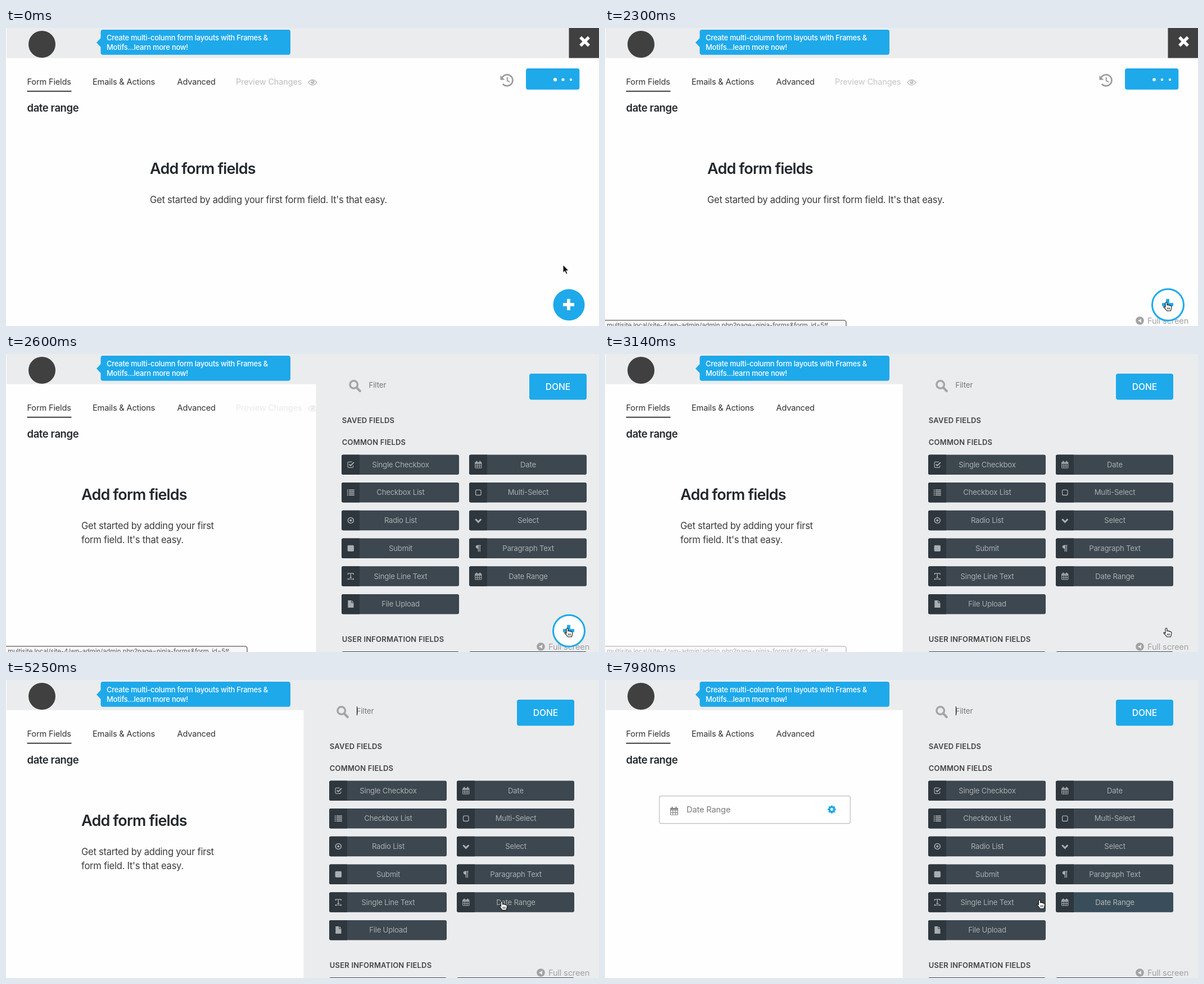
Animation of 1055x531 px, one loop 8000 ms. Source, as an HTML page:

```html
<!DOCTYPE html>
<html lang="en">
<head>
<meta charset="utf-8">
<title>Form builder</title>
<style>
  html, body { margin: 0; width: 100%; height: 100%; overflow: hidden; background: #fefefe; }
  svg { display: block; width: 100vw; height: 100vh; cursor: default; }
  text {
    font-family: Inter, Roboto, "Liberation Sans", sans-serif;
    font-optical-sizing: none;
    white-space: pre;
  }
</style>
</head>
<body>
<svg id="stage" viewBox="0 0 1055 531"></svg>
<script>
const LOOP = 8000;
const BLUE = '#1ea9ea', PANEL = '#ebecee', DARK = '#404040';
const DRAWER_X = 529.5;

// ---- markup helpers ----
const text = (x, y, str, size, fill, { ls = 0, w = 400, mid = false, id = '' } = {}) =>
  `<text ${id && `id="${id}"`} x="${x}" y="${y}" font-size="${size}" font-weight="${w}" fill="${fill}"
    text-anchor="${mid ? 'middle' : 'start'}" style="letter-spacing:${ls}px">${str.replace(/&/g, '&amp;')}</text>`;
const rect = (x, y, w, h, fill, r = 0, extra = '') =>
  `<rect x="${x}" y="${y}" width="${w}" height="${h}" rx="${r}" fill="${fill}" ${extra}/>`;
const path = (d, fill = 'none', stroke = 'none', w = 1, extra = '') =>
  `<path d="${d}" fill="${fill}" stroke="${stroke}" stroke-width="${w}" ${extra}/>`;
const circle = (x, y, r, fill, extra = '') =>
  `<circle cx="${x}" cy="${y}" r="${r}" fill="${fill}" ${extra}/>`;
const group = (id, body, extra = '') => `<g ${id && `id="${id}"`} ${extra}>${body}</g>`;
const at = (x, y, body, color = '#000') => group('', body, `transform="translate(${x} ${y})" color="${color}"`);
const line = (d, w = 1) => path(d, 'none', 'currentColor', w);
const solid = d => path(d, 'currentColor');

// ---- icons, centred on 0,0 ----
const icons = {
  check: line('M4.5 1.5V3.5Q4.5 5.2 2.8 5.2H-3.5Q-5.2 5.2-5.2 3.5V-3Q-5.2-4.7-3.5-4.7H2.5', 1.2) +
         line('M-2.6-.6L-.2 1.8L5.6-4', 2),
  list: line('M-6.5-4.5h2M-6.5-1.5h2M-6.5 1.5h2M-6.5 4.5h2M-3.3-4.5h9.8M-3.3-1.5h9.8M-3.3 1.5h9.8M-3.3 4.5h9.8', 1.7),
  radio: circle(0, 0, 5, 'none', 'stroke="currentColor" stroke-width="1.6"') + circle(0, 0, 2, 'currentColor'),
  stop: rect(-5.7, -5.5, 11.4, 11, 'currentColor', 1.8),
  type: line('M-4.8-2.6V-5H4.8V-2.6M0-5V2.6M-2 2.6H2', 1.4) + line('M-5 5.2H5', 1.1) +
        solid('M-6.3 5.2l2.4-1.9v3.8zM6.3 5.2l-2.4-1.9v3.8z'),
  file: solid('M-5-6.5H1V-2H5.2V6.5H-5zM2-6.5L5.2-3H2z'),
  calendar: line('M-5.6-4.2H5.6V6H-5.6zM-5.6-1.2H5.6M-5.6 2.4H5.6M-2-1.2V6M1.9-1.2V6', 1) +
            line('M-5.6-3H5.6', 1.6) + line('M-3-6.5V-2.6M3-6.5V-2.6', 1.9),
  square: rect(-4.7, -4.7, 9.4, 9.4, 'none', 2, 'stroke="currentColor" stroke-width="1.3"'),
  chevron: line('M-5-2.2L0 2.8L5-2.2', 3),
  para: solid('M4.5-5.8V-4.6H3.6V6H2.2V-4.6H.8V6H-.6V.6Q-4.6.4-4.6-2.6Q-4.6-5.8-.8-5.8z'),
};

const FIELD_W = 209, FIELD_H = 35.5, ROW = 49.7, COLS = [575, 802];
const fields = [
  ['check', 'Single Checkbox', 'calendar', 'Date'],
  ['list', 'Checkbox List', 'square', 'Multi-Select'],
  ['radio', 'Radio List', 'chevron', 'Select'],
  ['stop', 'Submit', 'para', 'Paragraph Text'],
  ['type', 'Single Line Text', 'calendar', 'Date Range'],
  ['file', 'File Upload'],
];

function field(x, y, icon, label, hover = false) {
  const ink = hover ? '#fff' : '#a9aeb1';
  return rect(x, y, FIELD_W, FIELD_H, hover ? BLUE : '#3c474f', 3) +
    path(`M${x + 32} ${y}h-29q-3 0-3 3v${FIELD_H - 6}q0 3 3 3h29z`, '#2f373e') +
    at(x + 16.3, y + 17.7, icons[icon], ink) +
    text(x + 105, y + 22.3, label, 13.2, ink, { ls: -.24, mid: true, w: hover ? 500 : 400 });
}

function fieldGrid() {
  let out = '';
  fields.forEach((row, r) => {
    for (let c = 0; c < row.length / 2; c++)
      out += field(COLS[c], 179.4 + r * ROW, row[c * 2], row[c * 2 + 1]);
  });
  return out + COLS.map(x => rect(x, 530, FIELD_W, 20, '#3c474f', 3)).join('');
}

function gear(x, y) {
  let teeth = '';
  for (let i = 0; i < 8; i++)
    teeth += rect(-1.6, -7.2, 3.2, 4, BLUE, .6, `transform="rotate(${i * 45})"`);
  return at(x, y, teeth + circle(0, 0, 4.1, 'none', `stroke="${BLUE}" stroke-width="3.2"`));
}

// ---- scene ----
const TAB = { ls: -.18 };
const SECTION = { w: 600, ls: .19 };
const header =
  rect(1, 0, 1054, 53.5, PANEL) +
  circle(64, 29, 24, DARK) +
  rect(168.5, 3, 337.5, 44.7, BLUE, 4) + path('M161 26L169 17.5V34.5z', BLUE) +
  text(179, 21.5, 'Create multi-column form layouts with Frames &', 13, '#fff', { w: 500, ls: -.26 }) +
  text(179, 38.5, 'Motifs...learn more now!', 13, '#fff', { w: 500, ls: -.26 }) +
  rect(1001.5, 0, 53.5, 53.5, DARK) +
  path('M1022 16.5L1037 31.5M1037 16.5L1022 31.5', 'none', '#fff', 5.4);

const tabs =
  text(37.5, 101.3, 'Form Fields', 14.6, '#333', TAB) +
  text(154, 101.3, 'Emails & Actions', 14.6, '#333', TAB) +
  text(304.5, 101.3, 'Advanced', 14.6, '#333', TAB) +
  rect(37.5, 111.7, 79, 2, '#3a3a3a') +
  group('preview',
    text(409, 101.3, 'Preview Changes', 14.6, '#bdbdbd', TAB) +
    path('M537.8 97Q545.5 87.5 553.2 97Q545.5 106.5 537.8 97z', 'none', '#bdbdbd', 1.4) +
    circle(545.5, 96.4, 3.4, '#bdbdbd') + circle(544.5, 95.2, 1, '#fff')) +
  path('M882.6 88.5A10 10 0 1 1 883.8 99.6', 'none', '#9b9b9b', 2.6) +
  path('M879.5 84.5V92.5H887.5z', '#9b9b9b') +
  path('M891.8 87.5V94L896 96.2', 'none', '#9b9b9b', 2) +
  rect(925, 72, 95.3, 37.7, BLUE, 4) +
  [977, 991, 1005].map(x => circle(x, 92, 2.2, '#fff', 'class="dot"')).join('');

const content =
  text(37.5, 149, 'date range', 18.5, '#23282d', { w: 600, ls: -.4 }) +
  group('intro',
    text(256, 260, 'Add form fields', 27, '#23282d', { w: 600, ls: -.85 }) +
    text(256, 311.5, '', 16.6, '#3c3c3c', { ls: -.27, id: 'line1' }) +
    text(256, 337, '', 16.6, '#3c3c3c', { ls: -.27, id: 'line2' })) +
  group('card',
    rect(96.7, 206.7, 339.6, 49, '#fff', 3, 'stroke="#bdbdbd" stroke-width="1.2"') +
    at(123, 233.3, `<g transform="scale(1.15)">${icons.calendar}</g>`, '#858585') +
    text(145, 235.6, 'Date Range', 14.7, '#7a7a7a', TAB) +
    gear(403.5, 230.6));

const drawer = group('drawer',
  rect(DRAWER_X, 0, 560, 531, PANEL) +
  circle(596.7, 54.5, 6.8, 'none', 'stroke="#a5a5a5" stroke-width="3.4"') +
  path('M601.8 59.8L607.8 66', 'none', '#a5a5a5', 4.2, 'stroke-linecap="round"') +
  text(623.5, 60.2, 'Filter', 13.3, '#777', { ls: -.1 }) +
  rect(624, 47, 1, 16, '#111', 0, 'id="caret"') +
  rect(909, 35, 102, 46.6, BLUE, 4) +
  text(960, 63.8, 'DONE', 15.7, '#fff', { w: 500, mid: true }) +
  text(575.8, 122.8, 'SAVED FIELDS', 13, '#424242', SECTION) +
  text(575.8, 162.3, 'COMMON FIELDS', 13, '#424242', SECTION) +
  text(575.8, 513.2, 'USER INFORMATION FIELDS', 13, '#424242', SECTION) +
  fieldGrid() +
  group('hover', field(COLS[1], 179.4 + 4 * ROW, 'calendar', 'Date Range', true)));

const overlay =
  group('full',
    circle(951.5, 521.5, 7.3, '#a3a3a3') + path('M948 521.5L954 518V525z', PANEL) +
    text(965, 526.5, 'Full screen', 14.7, '#a3a3a3', { ls: -.2 })) +
  group('add',
    circle(1001.5, 493.3, 28, BLUE, 'id="disc"') +
    path('M991 492.8h20M1001 482.8v20', 'none', '#fff', 5.8, 'id="plus"')) +
  group('status',
    rect(-6, 520.7, 358, 24, '#f7f7f7', 4, 'id="bubble" stroke="#777" stroke-width="1.6"') +
    text(3, 534, '', 11.5, '#5a5a5a', { ls: -.15, id: 'url' }));

const pointers =
  group('arrow', path('M0 0V14.2L3.2 11.3L5.6 16.6L8 15.6L5.7 10.4H10z', '#111', '#fff', 1)) +
  group('hand',
    path('M-1.5 1.2Q0-1.2 1.5 1.2V5.2Q3.4 4 4.4 5.6Q6.2 4.8 7 6.4Q9.4 5.8 9.4 8.4Q9.4 11.5 7.8 15.5H1' +
         'Q-1.5 12-4.6 8.6Q-4.4 6.6-1.5 9z', '#fff', '#111', 1.1) +
    path('M2 9.5v3.6M4 9.5v3.6M6 9.5v3.6', 'none', '#111', .8));

const stage = document.getElementById('stage');
stage.innerHTML = header + tabs + content + drawer + overlay + pointers;

// ---- motion ----
const $ = id => document.getElementById(id);
const dots = [...document.querySelectorAll('.dot')];
const show = (id, on) => $(id).setAttribute('visibility', on ? 'visible' : 'hidden');
const fade = (id, a) => $(id).setAttribute('opacity', a);
const set = (node, attrs) => { for (const k in attrs) node.setAttribute(k, attrs[k]); };
const ramp = (t, a, b) => Math.min(1, Math.max(0, (t - a) / (b - a)));

const track = [
  [0, 991, 422], [89, 991, 422], [90, 994, 440], [239, 994, 440], [240, 997, 459],
  [500, 998.5, 488.5], [3403, 998.5, 488.5], [3760, 948, 424], [4100, 914, 396],
  [4179, 914, 396], [4270, 892, 395], [4359, 892, 395], [4360, 882, 394.5],
  [7599, 882, 394.5], [7600, 915, 395], [7779, 915, 395], [7780, 882, 394.5],
  [7979, 882, 394.5], [7980, 773, 391.7], [LOOP, 773, 391.7],
];
const blinks = [3150, 3650, 4090, 4810, 5250, 5790, 6240, 6690, 7780];

function pointerAt(t) {
  const i = Math.max(1, track.findIndex(k => k[0] > t));
  const [t0, x0, y0] = track[i - 1], [t1, x1, y1] = track[i];
  const k = ramp(t, t0, t1);
  return [x0 + (x1 - x0) * k, y0 + (y1 - y0) * k];
}

function render(t) {
  // Saving dots pulse one after the other
  dots.forEach((dot, i) => {
    const wave = Math.max(0, Math.cos((t - i * 145) / 1200 * 2 * Math.PI));
    dot.setAttribute('r', 2.2 + wave ** 3);
  });

  // Drawer slides in and the page reflows
  const edge = t < 2600 ? 741 : t < 2780 ? 551.5 : DRAWER_X;
  show('drawer', t >= 2450);
  $('drawer').setAttribute('transform', `translate(${edge - DRAWER_X} 0)`);
  fade('preview', 1 - ramp(t, 2230, 2760));
  show('full', t >= 2300);

  const left = t < 2300 ? 256 : t < 2450 ? 182 : 134;
  const words = "Get started by adding your first form field. It's that easy.";
  const cut = t < 2450 ? words.length : words.indexOf(t < 2600 ? 'that' : 'form');
  $('line1').textContent = words.slice(0, cut).trim();
  $('line2').textContent = words.slice(cut);
  $('intro').setAttribute('transform', `translate(${left - 256} 0)`);

  const added = t >= 7060;
  show('intro', !added);
  show('card', added);

  // Add button
  const over = t >= 400, pressed = t >= 2060;
  show('add', t < 2780);
  set($('disc'), {
    fill: over ? '#fff' : BLUE,
    stroke: over ? BLUE : 'none',
    'stroke-width': pressed ? 3 : 2,
    r: over && !pressed ? 27.2 : 28,
  });
  $('plus').setAttribute('stroke', over ? BLUE : '#fff');

  // Link preview
  fade('status', ramp(t, 600, 850) * (1 - ramp(t, 2930, 3310)));
  $('bubble').setAttribute('width', 358 + 77 * ramp(t, 1970, 2150));
  $('url').textContent = 'multisite.local/site-4/wp-admin/admin.php?page=ninja-forms&' + (pressed ? 'form_id=5#' : '');

  show('caret', t >= 2780 && blinks.filter(b => b <= t).length % 2 === 1);
  fade('hover', t < 6690 ? 0 : 1 - .93 * ramp(t, 7200, 7420));

  const [x, y] = pointerAt(t);
  const arrow = t < 400 || (t > 3403 && y > 413);
  show('arrow', arrow);
  show('hand', !arrow);
  for (const id of ['arrow', 'hand']) $(id).setAttribute('transform', `translate(${x} ${y})`);
}

const start = performance.now();
function tick() {
  render((performance.now() - start) % LOOP);
  requestAnimationFrame(tick);
}
tick();
</script>
</body>
</html>
```
